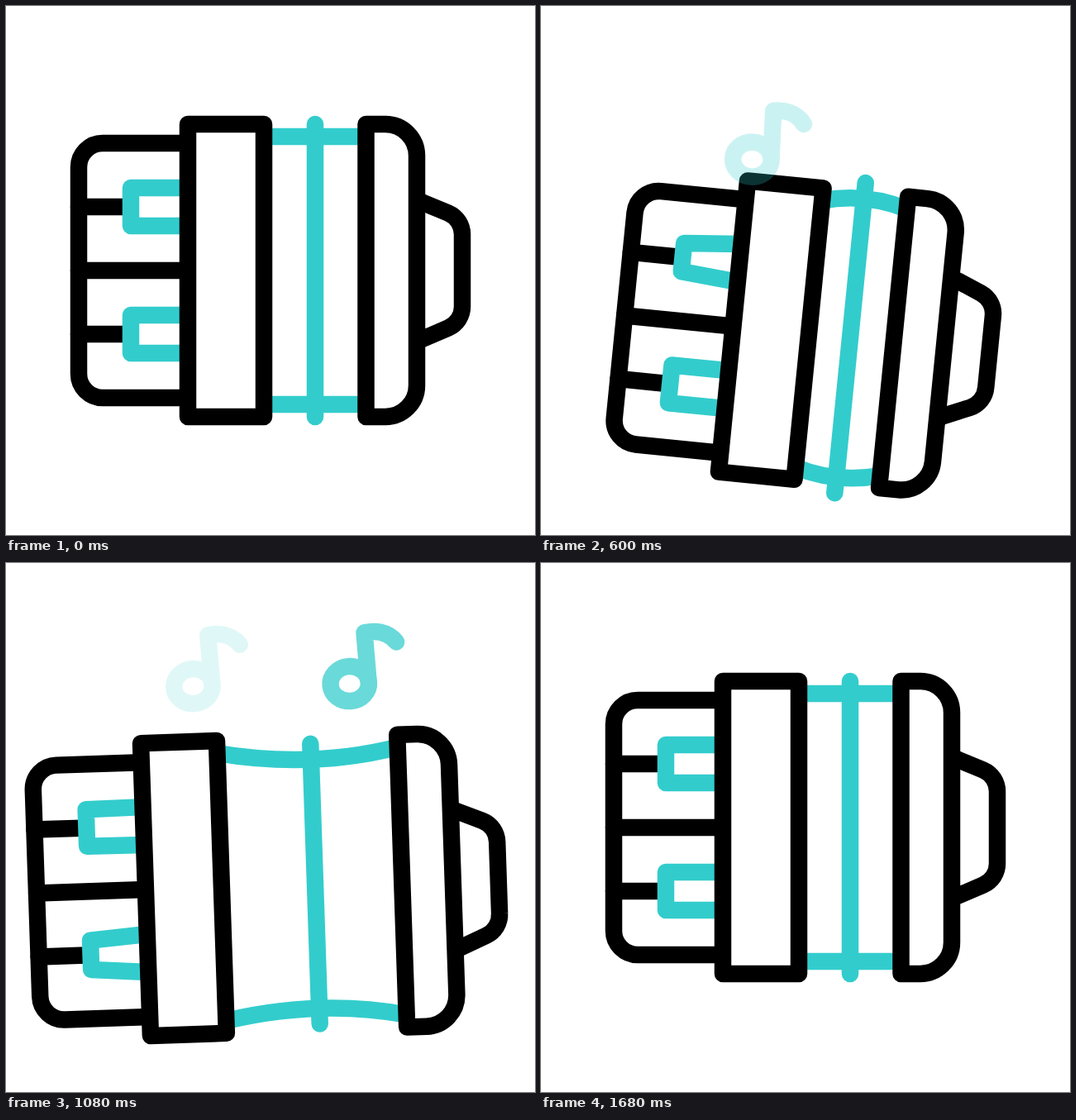
An HTML page for the animation above (2 s loop, 640 by 640 pixels).

```html
<!DOCTYPE html>
<html lang="en">
<head>
<meta charset="utf-8">
<title>Accordion</title>
<style>
  html, body { margin: 0; width: 100%; height: 100%; overflow: hidden; background: #fff; }
  svg { display: block; width: 100%; height: 100%; }
  .line { fill: none; stroke: #000; stroke-width: 20.5; stroke-linecap: round; stroke-linejoin: round; }
  .teal { stroke: #3cc; }
  .butt { stroke-linecap: butt; }
  .solid { fill: #fff; }
</style>
</head>
<body>
<svg viewBox="0 0 640 640">
  <defs>
    <g id="note" class="line teal">
      <ellipse cx="-23" cy="60" rx="23.2" ry="21"/>
      <path d="M0 58V0C12 -1.5 28 0 37.5 14.5"/>
    </g>
  </defs>
  <g id="body" class="line">
    <path id="bellows" class="teal butt"/>
    <path id="bar" class="teal"/>
    <g id="left">
      <path d="M220 166H117a29 29 0 0 0 -29 29V445a29 29 0 0 0 29 29H220"/>
      <path d="M88 243H145M88 320H220M88 397H145"/>
      <path id="keyTop" class="teal butt"/>
      <path id="keyLow" class="teal butt"/>
      <rect class="solid" x="220" y="143" width="92" height="354"/>
    </g>
    <g id="right">
      <path d="M500 236L535 250.5A28 28 0 0 1 552 277V363A28 28 0 0 1 535 389.5L500 404.5"/>
      <path class="solid" d="M435.5 143H459a38 38 0 0 1 38 38V459a38 38 0 0 1 -38 38H435.5Z"/>
    </g>
    <use id="noteA" href="#note"/>
    <use id="noteB" href="#note"/>
  </g>
</svg>
<script>
  const LOOP = 2000, STEP = 40, CX = 374;
  const $ = id => document.getElementById(id);
  const set = (id, name, value) => $(id).setAttribute(name, value);

  const ramp = (t, a, b) => Math.min(1, Math.max(0, (t - a) / (b - a)));
  const ease = (t, a, b) => {
    const u = ramp(t, a, b);
    return u * u * (3 - 2 * u);
  };

  function drawKey(id, y, inset) {
    set(id, 'd', `M220 ${y}L151 ${y + inset}V${y + 46 - inset}L220 ${y + 46}`);
  }

  function drawNote(id, x, t) {
    const y = 56 - 41 * ease(t, 575, 1065);
    set(id, 'transform', `translate(${x} ${y}) rotate(-3)`);
    set(id, 'opacity', ramp(t, 560, 720) - ramp(t, 933, 1105));
  }

  function draw(t) {
    const drop = 91 * (ease(t, 116, 720) - ease(t, 872, 1508));
    const tilt = 7.05 * ease(t, 116, 420) - 9.35 * ease(t, 420, 1170) + 2.3 * ease(t, 1170, 1510);
    const open = ease(t, 740, 1162);
    const squeeze = ease(t, 261, 720) - open;
    const pull = open - ease(t, 1240, 1660);

    const dl = 14.2 * squeeze - 58.3 * pull;
    const dr = -10.4 * squeeze + 49.7 * pull;
    const tip = 14 * squeeze - 9.9 * pull;
    const bend = 2 * (9 * squeeze - 13.6 * pull);

    set('body', 'transform', `translate(0 ${drop}) rotate(${tilt} ${CX} 320)`);
    set('left', 'transform', `translate(${dl} 0)`);
    set('right', 'transform', `translate(${dr} 0)`);
    set('bar', 'd', `M${CX} ${143 - tip}V${497 + tip}`);

    const xl = 312 + dl, xr = 435.5 + dr;
    set('bellows', 'd',
      `M${xl} 158Q${CX} ${158 - bend} ${xr} 158M${xl} 482Q${CX} ${482 + bend} ${xr} 482`);

    drawKey('keyTop', 220, 7 * squeeze);
    drawKey('keyLow', 374, 5.8 * pull);
    drawNote('noteA', 254.4, t);
    drawNote('noteB', 443.7, t - 100);
  }

  // The picture advances at 25 frames per second.
  let start;
  function tick(now) {
    start ??= now;
    draw(Math.floor(((now - start) % LOOP) / STEP) * STEP);
    requestAnimationFrame(tick);
  }
  draw(0);
  requestAnimationFrame(tick);
</script>
</body>
</html>
```
